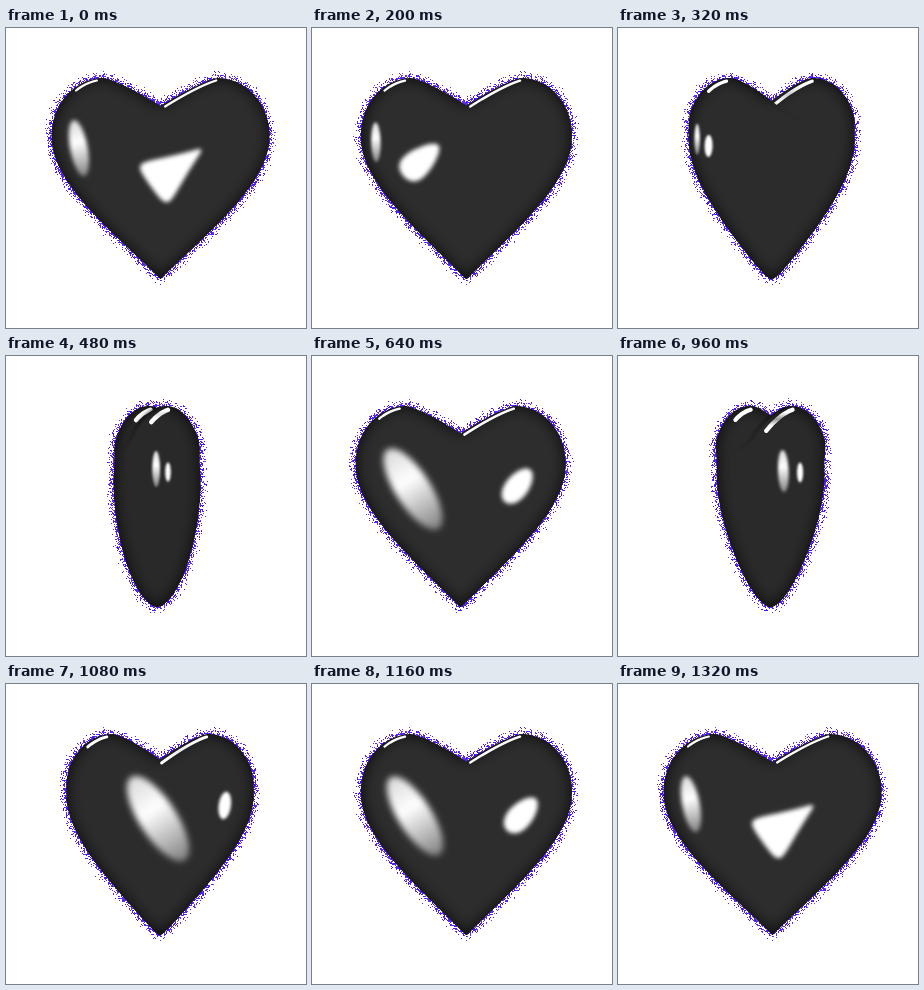
An HTML page with a canvas that plays this animation: 300 px wide and 300 px high, repeating every 1400 ms.

```html
<!DOCTYPE html>
<html>
<head>
<meta charset="utf-8">
<title>Turning heart</title>
<style>
html, body { margin: 0; width: 100%; height: 100%; overflow: hidden; background: #fff; }
canvas { display: block; }
</style>
</head>
<body>
<canvas id="stage" width="300" height="300"></canvas>
<script>
const SIZE = 300, LOOP = 1400, STEP = 40, LAST = 32;
const TOP = 50, NOTCH = 78, TIP = 251;
const WIDE = 109, DEEP = 43;
const RAD = Math.PI / 180;

function layer() {
  const c = document.createElement('canvas');
  c.width = c.height = SIZE;
  return c.getContext('2d', { willReadFrequently: true });
}
const stage = document.getElementById('stage').getContext('2d');
const mask = layer(), rim = layer(), body = layer(), glow = layer();

const smooth = u => { u = Math.max(0, Math.min(1, u)); return u * u * (3 - 2 * u); };
const white = a => `rgba(255,255,255,${a})`;
const wipe = g => g.clearRect(0, 0, SIZE, SIZE);

// Seeded grain: two random values per pixel
let seed = 7;
const random = () => (seed = (seed * 16807) % 2147483647) / 2147483647;
const grain = Float32Array.from({ length: SIZE * SIZE }, random);
const tint = Float32Array.from({ length: SIZE * SIZE }, random);

// Heart profile: outer and inner edge of one lobe, and its depth, by height
function outer(y) {
  if (y < 108) return 57 + 52 * Math.sqrt(1 - ((108 - y) / 58) ** 2);
  const w = (y - 108) / 143;
  return WIDE * (1 - 1.68 * w * w + 0.68 * w ** 3);
}
function inner(y) {
  return y < NOTCH ? 57 - 57 * ((y - TOP) / 28) ** 0.78
                   : -outer(y) * smooth((y - NOTCH) / 36);
}
function depth(y) {
  return y < 128 ? 41 * Math.sqrt(1 - ((128 - y) / 78) ** 2)
                 : 41 * (1 - ((y - 128) / 123) ** 2) ** 0.58;
}

// Horizontal span of a turned lobe; side -1 is the near one, 1 the far one
function span(side, y, cos, sin) {
  const o = outer(y), i = inner(y);
  const mid = side * cos * (o + i) / 2;
  const half = Math.hypot((o - i) / 2 * cos, depth(y) * sin);
  return [mid - half, mid + half];
}
function lobe(side, cos, sin) {
  const path = new Path2D(), left = [], n = 120;
  for (let k = 0; k <= n; k++) {
    const y = TOP + (TIP - TOP) * (1 - Math.cos(Math.PI * k / n)) / 2;
    const [a, b] = span(side, y, cos, sin);
    left.push([a, y]);
    path.lineTo(b, y);
  }
  left.reverse().forEach(p => path.lineTo(p[0], p[1]));
  path.closePath();
  return path;
}

// Two lamps: direction, its shift on the flat face, height, tilt and sweep,
// then [base, growth] of length and width, taper, fade and blur
const LAMPS = [
  { dir: -37, shift: 13, y: 109.5, rise: 0.11, tilt: 90, sweep: -33,
    len: [13, 0.16], wid: [1.5, 0.075], taper: 0, fade: 0.6, blur: 3.2 },
  { dir: -8, shift: 10, y: 114, rise: 0.11, tilt: -90, sweep: 54,
    len: [8, 0.085], wid: [1.5, 0.068], taper: 0.65, fade: 0, blur: 2.2 }
];

// Reflection on a turned ellipse; it grows with the radius of curvature
function reflect(g, lamp, turn, cos, sin) {
  const dir = lamp.dir + lamp.shift * cos * cos;
  const nx = Math.sin((dir - turn) * RAD), nz = Math.cos((dir - turn) * RAD);
  const aa = WIDE ** 2, bb = DEEP ** 2;
  const d = Math.hypot(WIDE * nx, DEEP * nz);
  const flat = aa * bb / d ** 3 * Math.cos(dir * RAD);
  const x = (aa * nx * cos + bb * nz * sin) / d;
  const ease = smooth((flat - 20) / 200);
  const len = lamp.len[0] + lamp.len[1] * flat;
  const wid = lamp.wid[0] + lamp.wid[1] * flat;
  const taper = lamp.taper * smooth((flat - 120) / 150);

  g.save();
  g.translate(x, lamp.y + lamp.rise * flat);
  g.rotate((lamp.tilt + lamp.sweep * ease) * RAD);
  g.filter = `blur(${Math.min(lamp.blur, 0.5 + wid * 0.2)}px)`;
  const paint = g.createLinearGradient(-len, 0, len, 0);
  paint.addColorStop(0, white(1 - lamp.fade * 0.3));
  paint.addColorStop(0.4, white(1));
  paint.addColorStop(1, white(1 - lamp.fade));
  g.fillStyle = paint;
  g.beginPath();
  for (let k = 0; k < 40; k++) {
    const t = k * Math.PI / 20, c = Math.cos(t);
    g.lineTo(len * (c + 0.35 * taper * Math.cos(2 * t)),
             wid * Math.sin(t) * (1 - taper * c));
  }
  g.fill();
  g.restore();
}

// Glint just inside the upper left edge of a lobe, longer on the right lobe
function glint(g, side, cos, sin) {
  const right = smooth(1.8 * side * cos);
  const end = 61 + 16 * right, inset = 3 + 6 * sin ** 4;
  const paint = g.createLinearGradient(0, TOP, 0, end);
  paint.addColorStop(0.3, white(1));
  paint.addColorStop(0.6, white(1 - 0.9 * right * sin ** 4));
  paint.addColorStop(0.9, white(1));
  g.save();
  g.filter = 'blur(0.7px)';
  g.strokeStyle = paint;
  g.lineCap = g.lineJoin = 'round';
  g.lineWidth = 2.2 + 2.4 * sin * sin;
  g.beginPath();
  for (let y = TOP + 1; y <= end; y++) {
    g.lineTo(span(side, y, cos, sin)[0] + inset, y + 1.5 + 1.5 * sin * sin);
  }
  g.stroke();
  g.restore();
}

// Soft dark line where the near lobe overlaps the far one
function crease(g, cos, sin) {
  const edge = cos > 0 ? 1 : 0;
  const shade = g.createLinearGradient(0, 60, 0, 100);
  shade.addColorStop(0, `rgba(0,0,0,${0.6 * sin * sin})`);
  shade.addColorStop(1, 'rgba(0,0,0,0)');
  g.save();
  g.filter = 'blur(1.5px)';
  g.lineWidth = 2.5;
  g.strokeStyle = shade;
  g.beginPath();
  for (let y = TOP + 1; y <= 100; y += 2) g.lineTo(span(-1, y, cos, sin)[edge], y);
  g.stroke();
  g.restore();
}

function drawGlow() {
  wipe(glow);
  glow.filter = 'blur(4.4px)';
  glow.drawImage(mask.canvas, 0, 0);
  glow.filter = 'none';
  const img = glow.getImageData(0, 0, SIZE, SIZE), d = img.data;
  for (let i = 0; i < grain.length; i++) {
    const on = grain[i] < d[i * 4 + 3] / 255 * 1.45 - 0.03;
    d[i * 4] = 60 + 50 * tint[i];
    d[i * 4 + 1] = 10 + 50 * tint[i];
    d[i * 4 + 2] = 245;
    d[i * 4 + 3] = on ? 255 : 0;
  }
  glow.putImageData(img, 0, 0);
}

function drawBody(near, turn, centre, cos, sin) {
  const grey = Math.round(40 + 5 * Math.abs(cos));
  body.globalCompositeOperation = 'source-over';
  wipe(body);
  body.drawImage(mask.canvas, 0, 0);
  body.globalCompositeOperation = 'source-atop';
  body.fillStyle = `rgb(${grey},${grey},${grey})`;
  body.fillRect(0, 0, SIZE, SIZE);
  body.save();
  body.filter = 'blur(8px)';
  body.globalAlpha = 0.85;
  body.drawImage(rim.canvas, 0, 0);
  body.restore();

  body.save();
  body.translate(centre, 0);
  // the far glint shows only where the near lobe leaves it free
  const free = new Path2D();
  free.rect(-SIZE, 0, 2 * SIZE, SIZE);
  free.addPath(near);
  body.save();
  body.clip(free, 'evenodd');
  glint(body, 1, cos, sin);
  body.restore();
  crease(body, cos, sin);
  glint(body, -1, cos, sin);
  for (const lamp of LAMPS) reflect(body, lamp, turn, cos, sin);
  body.restore();
}

function draw(step) {
  const full = 360 * smooth(step / LAST);
  const centre = 151.5 + 3 * Math.cos(full * RAD);
  // front and back are alike, so half a turn describes the look
  const turn = full % 180;
  const cos = Math.cos(turn * RAD), sin = Math.sin(turn * RAD);
  const near = lobe(-1, cos, sin), far = lobe(1, cos, sin);

  wipe(mask);
  mask.setTransform(1, 0, 0, 1, centre, 0);
  mask.fill(far);
  mask.fill(near);
  mask.setTransform(1, 0, 0, 1, 0, 0);

  rim.globalCompositeOperation = 'source-over';
  rim.fillRect(0, 0, SIZE, SIZE);
  rim.globalCompositeOperation = 'destination-out';
  rim.drawImage(mask.canvas, 0, 0);

  drawGlow();
  drawBody(near, turn, centre, cos, sin);

  stage.fillStyle = '#fff';
  stage.fillRect(0, 0, SIZE, SIZE);
  stage.drawImage(glow.canvas, 0, 0);
  stage.drawImage(body.canvas, 0, 0);
}

let shown = -1;
function tick() {
  const t = performance.now() % LOOP;
  const step = Math.max(0, Math.min(LAST, Math.floor(t / STEP) - 1));
  if (step !== shown) draw(shown = step);
  requestAnimationFrame(tick);
}
tick();
</script>
</body>
</html>
```
